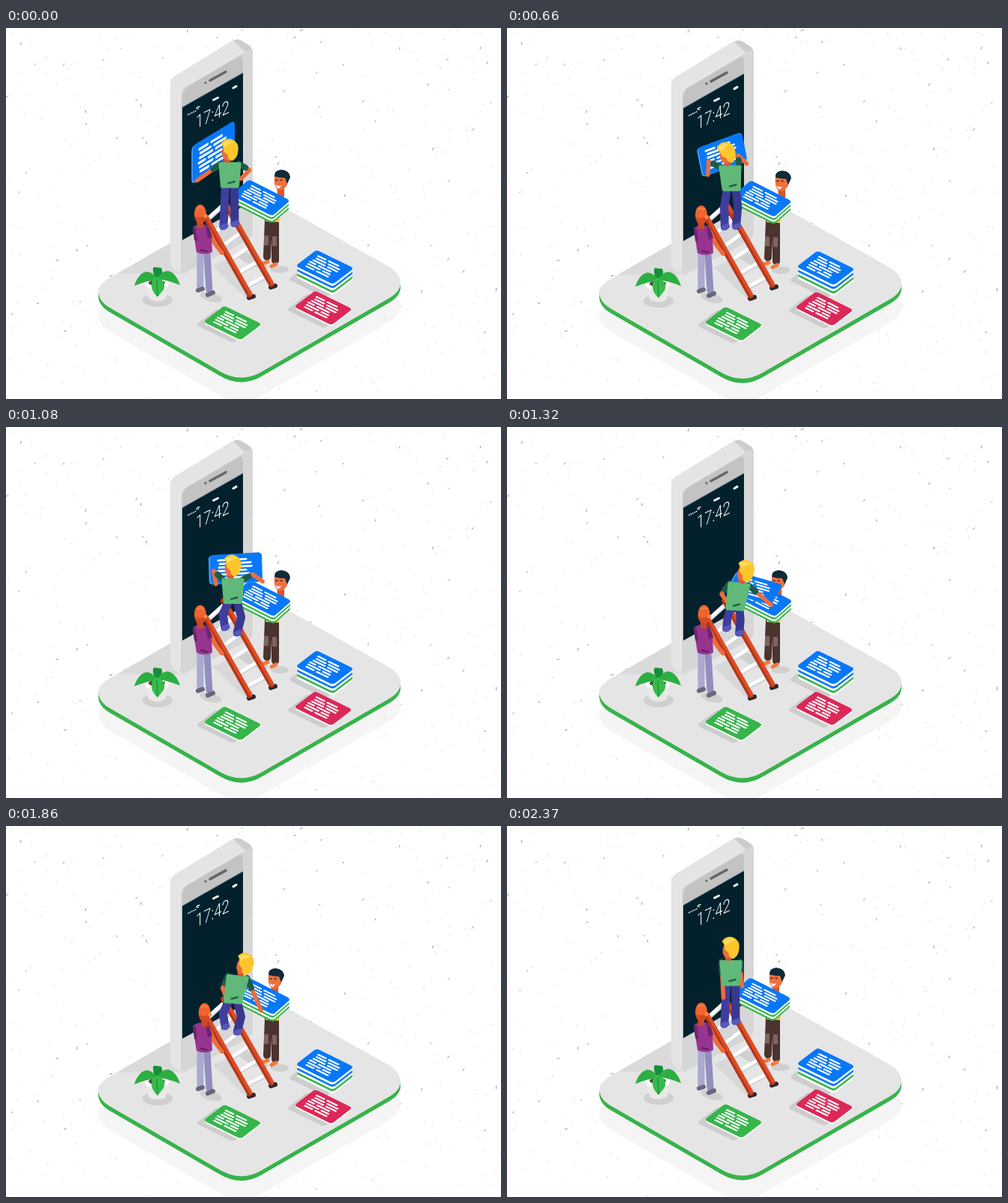
An HTML page that plays this animation: 660 px wide and 495 px high, repeating every 2400 ms.

```html
<!DOCTYPE html>
<html lang="en">
<head>
<meta charset="utf-8">
<title>Clearing phone notifications</title>
<style>
  html, body { margin: 0; width: 100%; height: 100%; overflow: hidden; background: #fff; }
  svg { display: block; width: 660px; height: 495px; }
  .line { fill: none; stroke-linecap: round; stroke-linejoin: round; }
  .skin { stroke: #ee6c3c; stroke-width: 5.5; }
  .sleeve { stroke: #1d5a48; stroke-width: 8; }
  .leg { stroke: #3f3e9f; stroke-width: 11; }
  .shoe { stroke: #5558bb; stroke-width: 7; }
  .clock { font: 300 24px Roboto, "Liberation Sans", sans-serif; fill: #fff; }
</style>
</head>
<body>
<svg viewBox="0 0 660 495">
  <defs>
    <path id="slab" d="M146 328 L318 229 Q335 219 352 228 L508 316 Q526 326 526 339 Q526 351 510 360 L342 457 Q314 474 285 457 L138 372 Q123 363 123 350 Q123 340 146 328Z"/>
    <rect id="plate" width="100" height="70" rx="8"/>
    <path id="rows" class="line" stroke="#fff" stroke-width="4.8"/>
  </defs>

  <use href="#slab" y="33" fill="#f5f5f5"/>
  <g id="specks" class="line"></g>

  <g class="bob">
    <use href="#slab" y="7" fill="#37b34a"/>
    <use href="#slab" y="1" fill="#e5e5e5"/>
    <path d="M148 328 L222 285 L240 328Z" fill="#dadada"/>

    <path d="M219 74 Q219 68 225 64 L300 18 Q308 13 316 18 L324 23 Q329 26 329 33 V270 Q329 280 321 284 L240 326 Q232 328 226 323 Q219 318 219 310Z" fill="#e4e4e4"/>
    <path d="M303 17 Q309 13 316 18 L324 23 Q329 26 329 36 L318 31Z" fill="#cdcdcd"/>
    <path d="M232 92 Q232 82 240 77 L318 31 Q329 26 329 36 V270 Q329 280 321 284 L240 326 Q232 328 232 320Z" fill="#d6d6d6"/>
    <path d="M235 105 V90 Q236 82 243 78 L311 38 Q316 36 316 43 V60Z" fill="#c3c3c3"/>
    <path d="M232 320 V92 Q232 82 240 77 L318 31" fill="none" stroke="#ededed" stroke-width="1.3"/>
    <path d="M235 106 L316 60 V238 L235 283Z" fill="#03212c"/>
    <path d="M235 106 L316 60" stroke="#3c566c"/>
    <path class="line" d="M272 70 L293 58.500" stroke="#666" stroke-width="3.500"/>
    <circle cx="266" cy="73" r="1.600" fill="#666"/>
    <path class="line" d="M243 115.500 L253 110.500" stroke="#fff" stroke-width="1.800" stroke-dasharray="0 2.700"/>
    <path class="line" d="M254 107.500 q1.500 -3 4 -2.500 M256 108 l.5 -.4" stroke="#fff" stroke-width="1.300"/>
    <path class="line" d="M276.500 96 L282.500 93" stroke="#fff" stroke-width="2.800"/>
    <path class="line" d="M303 80 L307 77.700" stroke="#fff" stroke-width="3"/>
    <text class="clock" transform="matrix(.77 -.37 0 1 253 134.500)">17:42</text>

    <g fill="#d0d0d0">
      <ellipse cx="202" cy="363" rx="20" ry="9"/>
      <ellipse cx="273" cy="359" rx="15" ry="6" transform="rotate(15 273 359)"/>
      <ellipse cx="329" cy="310" rx="22" ry="7" transform="rotate(25 329 310)"/>
      <path d="M276 318 L297 308 L330 352 L322 362Z" opacity=".6"/>
      <ellipse cx="365" cy="322" rx="12" ry="5"/>
    </g>

    <g transform="translate(0 -2)">
      <path d="M186 344 L190 363 Q202 370 213 363 L217 344Z" fill="#e9e9e9"/>
      <ellipse cx="201" cy="343" rx="16" ry="8" fill="#fff"/>
      <ellipse cx="201" cy="342" rx="11" ry="4" fill="#59423a"/>
      <path d="M200 339 Q194 325 197 321 L207 322 Q211 330 203 339Z" fill="#159038"/>
      <path id="leaf" d="M201 338 Q188 339 171 346 Q176 330 187 327 Q198 328 201 338Z" fill="#2cae43"/>
      <use href="#leaf" transform="matrix(-1 0 0 1 403 -1)"/>
      <path d="M201 334 Q215 340 210 351 L202 361 Q193 352 194 344 Q194 337 201 334Z" fill="#36bb4b"/>
      <path d="M201 338 L202 360" stroke="#15863a"/>
    </g>

    <g id="ground"></g>

    <g id="porter">
      <path class="line" d="M350 256 L348 305 M359 256 L359 310" stroke="#4b332e" stroke-width="10"/>
      <path d="M344 277 h6 v13 h-6z M355 278 h6 v13 h-6z" fill="#80645d"/>
      <path class="line" d="M349 312 L340 315 M360 315 L354 318" stroke="#f2793f" stroke-width="5"/>
      <path d="M352 226 L370 224 L364 259 L346 258Z" fill="#f5c634"/>
      <g id="porterHead">
        <path d="M361 208 h10 v17 h-9z" fill="#d9552d"/>
        <path d="M358 197 Q367 191 376 198 L375 209 Q370 218 363 216 Q356 212 358 197Z" fill="#f0703e"/>
        <path d="M358 198 Q357 190 367 189 Q378 190 379 199 L375 208 L372 200 Q364 200 358 198Z" fill="#102a37"/>
        <path d="M359 209 q4 3 8 1 q-2 4 -5 4z" fill="#fff"/>
        <path d="M359.500 203 h3 m3 0 h3" stroke="#3a2323" stroke-width="1.500"/>
      </g>
    </g>
    <g id="stack"></g>

    <g id="ladder"></g>
  </g>

  <g id="load"></g>
  <g id="climber">
    <path class="line leg" id="legR" style="stroke:#383890"/>
    <path class="line leg" id="legL"/>
    <path class="line shoe" id="shoes"/>
    <path class="line skin" id="arms"/>
    <path class="line sleeve" id="sleeves"/>
    <path id="torso" fill="#60b978" stroke="#60b978" stroke-width="5" stroke-linejoin="round"/>
    <path class="line" id="badge" stroke="#245f4c" stroke-width="2.500"/>
    <g id="head">
      <path d="M-5 2 h9 v14 q-5 3 -9 0z" fill="#d9552d"/>
      <ellipse cx="-2" cy="3" rx="7.500" ry="11" fill="#ee6c3c"/>
      <path d="M-12 -7 Q-7 -17 3 -14 Q12 -11 12 -1 Q13 9 6 14 Q0 14 -1 7 L-7 3 Q-7 -3 -12 -7Z" fill="#fdc72c"/>
      <path d="M-10 -8 Q-3 -14 5 -11 Q-2 -8 -6 -3Z" fill="#ffdc62"/>
    </g>
  </g>

  <g class="bob">
    <path class="line" d="M268 300 L271 349" stroke="#918fbd" stroke-width="9"/>
    <path class="line" d="M259 300 L259 345" stroke="#aaa9cf" stroke-width="9"/>
    <path class="line" d="M256 350 L262 348 M269 356 L276 353" stroke="#68677c" stroke-width="6"/>
    <path class="line" d="M271 271 L278 287 L288 300" stroke="#ee6c3c" stroke-width="5.500"/>
    <path d="M249 266 Q257 259 267 263 Q273 267 274 278 L275 299 Q264 304 254 299Z" fill="#96348f"/>
    <path d="M266 263 Q273 267 275 279 L269 281Z" fill="#6b256e"/>
    <path class="line" d="M251 268 L253 282" stroke="#6b256e" stroke-width="4"/>
    <path class="line" d="M260 296 l8 2" stroke="#5d1f60" stroke-width="2"/>
    <g id="helperHead">
      <path d="M254 254 h9 v13 h-8z" fill="#c9482a"/>
      <ellipse cx="259" cy="248" rx="8" ry="12.500" fill="#f0642f"/>
      <path d="M252 251 Q258 255 266 250 Q266 260 259 262 Q252 259 252 251Z" fill="#d54a22"/>
      <circle cx="266" cy="251" r="2.500" fill="#f58a52"/>
      <path class="line" d="M255 241 q4 -3 8 0" stroke="#f98b4e" stroke-width="1.500"/>
    </g>
  </g>
</svg>
<script>
const LOOP = 2400, STEP = 30, LAND = 1440;
const BLUE = '#0878f8', GREEN = '#35b54a', RED = '#dc2858', WHITE = '#fff';
const el = id => document.getElementById(id);
const setPath = (id, d) => el(id).setAttribute('d', d);

let seed = 17;
const rnd = () => (seed = seed * 16807 % 2147483647) / 2147483647;

function specks(count, size, color, width) {
  let d = '';
  for (let i = 0; i < count; i++) {
    const a = -rnd() * 1.6, l = size * (.4 + rnd());
    d += `M${rnd() * 660} ${rnd() * 495}l${l * Math.cos(a)} ${l * Math.sin(a)}`;
  }
  return `<path d="${d}" stroke="${color}" stroke-width="${width}"/>`;
}
el('specks').innerHTML = specks(420, 1.3, '#cfcfcf', .8) + specks(85, 2.6, '#858585', .9);

// Ragged rows of dashes, standing in for message text.
function dashes() {
  let d = '';
  for (let y = 14; y < 60; y += 8.5) {
    const end = 62 + 22 * rnd();
    for (let x = 14 + 8 * rnd(); x < end;) {
      const w = 8 + 24 * rnd();
      d += `M${x} ${y}h${Math.min(w, end - x)}`;
      x += w + 9;
    }
  }
  return d;
}
setPath('rows', dashes());

// Cards are drawn on a 100 x 70 plate placed by its corner and two edges.
const matrix = ([x, y, ux, uy, vx, vy]) =>
  `matrix(${ux / 100} ${uy / 100} ${vx / 70} ${vy / 70} ${x} ${y})`;
const plate = (m, fill) => `<use href="#plate" transform="${matrix(m)}" fill="${fill}"/>`;
const shift = ([x, y, ...edges], dx, dy) => [x + dx, y + dy, ...edges];

function pile(m, gap, colors) {
  const sheets = colors.map((c, i) => plate(shift(m, 0, i * gap), c)).reverse().join('');
  return sheets + `<use href="#rows" transform="${matrix(m)}"/>`;
}
function onGround(x, y, gap, ...colors) {
  const m = [x, y, 50, 24.5, -28, 21.5];
  return plate(shift(m, -10, gap * colors.length), '#cdcdcd') + pile(m, gap, colors);
}
const onStack = [325, 202, 55, 28, -24, 21];
el('ground').innerHTML =
  onGround(414, 296, 3, BLUE, WHITE, BLUE, WHITE, GREEN, WHITE) +
  onGround(412, 350.5, 2, RED, WHITE) + onGround(291, 370.5, 2, GREEN, WHITE);
el('stack').innerHTML = pile(onStack, 2.5, [BLUE, WHITE, GREEN, WHITE, GREEN]);
el('load').innerHTML = `<use href="#plate" x="-3" y="1" fill="#46a0ff"/>
  <use href="#plate" fill="${BLUE}"/><use href="#rows"/>`;

function ladder() {
  const left = t => [266 + 60 * t, 252 + 106 * t];
  const right = t => [290 + 65 * t, 230 + 114 * t];
  const stroke = (a, b, color, w) =>
    `<path class="line" d="M${a}L${b}" stroke="${color}" stroke-width="${w}"/>`;
  let s = '';
  for (let t = .03; t < .9; t += .17) {
    const a = left(t), b = right(t), low = ([x, y]) => [x, y + 2];
    s += stroke(low(a), low(b), '#d2d2d8', 5) + stroke(a, b, WHITE, 4.5);
  }
  for (const rail of [right, left]) {
    const [x, y] = rail(1);
    s += stroke([x - 2, y + 2], [x + 4, y], '#30262b', 6);
    s += stroke(rail(0), rail(.98), '#b4371d', 7.5);
    s += `<g transform="translate(1.5 -.8)">${stroke(rail(0), rail(.98), '#e04d22', 4)}</g>`;
  }
  return s;
}
el('ladder').innerHTML = ladder();

const mix = (a, b, k) => a.map((v, i) => v + (b[i] - v) * k);
const add = ([x, y], dx, dy) => [x + dx, y + dy];
const poly = (...pts) => 'M' + pts.join('L');
const move = (id, x, y, r = 0) =>
  el(id).setAttribute('transform', `translate(${x} ${y}) rotate(${r})`);

// Eased 0 to 1 between two times.
function rise(t, from, to) {
  const k = Math.min(1, Math.max(0, (t - from) / (to - from)));
  return k * k * (3 - 2 * k);
}

// Middle joint of a limb of two equal bones.
function joint(a, b, bone, side) {
  const dx = b[0] - a[0], dy = b[1] - a[1], d = Math.hypot(dx, dy);
  const h = side * Math.sqrt(Math.max(0, bone * bone - d * d / 4)) / d;
  return add(mix(a, b, .5), dy * h, -dx * h);
}

// The card is peeled off the screen, tipped towards the viewer and laid on the stack.
const PATH = [
  [0, [249, 157, 56, -34, 0, 50]],
  [420, [256, 157, 50, -26, 2, 37]],
  [840, [253, 162, 65, -18, 12, 39]],
  [1080, [272, 171, 69, -4, 1, 39]],
  [LAND, shift(onStack, 1, 2)]
];
function cardAt(t) {
  const i = PATH.findIndex(([end]) => t < end);
  if (i < 0) return PATH.at(-1)[1];
  const [t0, a] = PATH[i - 1], [t1, b] = PATH[i];
  return mix(a, b, (t - t0) / (t1 - t0));
}

function drawClimber(t, [x, y, ux, uy, vx, vy]) {
  const down = rise(t, 420, 1500) - rise(t, 1560, 2370);
  const reach = rise(t, 1080, 1500) - rise(t, 1600, 2300);
  const peer = rise(t, 0, 420) - rise(t, 600, 1080);
  const bend = 6 * Math.sin(Math.PI * down);

  const hips = [298.5 + 6 * down, 211 + 34 * down];
  const chest = add(hips, 9 * reach - 2 * peer, -29.5 - 5 * reach);
  const skull = add(chest, 15 * reach - 4 * peer - 1, 2 * reach - 19);
  const [hipL, hipR] = [add(hips, -10, -reach), add(hips, 10, reach)];
  const [shL, shR] = [add(chest, -12.5, -2 * reach), add(chest, 12.5, 2 * reach)];

  const footL = [290 + 3 * down, 264 + 4 * down];
  const footR = [305 + 5 * down, 260 + 14 * Math.min(1, 2 * down)];
  const [legTopL, legTopR] = [add(hipL, 4, 0), add(hipR, -4, 0)];
  const kneeL = add(mix(legTopL, footL, .5), -bend, 0);
  const kneeR = add(mix(legTopR, footR, .5), bend, 0);

  const landed = t >= LAND;
  const corner = [x + vx, y + vy];
  const gripL = add(corner, ux * .1, uy * .1), gripR = add(corner, ux, uy);
  const restL = add(hips, -10 + 4 * reach, 18 - 28 * reach);
  const restR = add(hips, 15, landed ? 3 : -10);
  const handL = mix(gripL, restL, rise(t, 1100, LAND));
  const handR = mix(restR, gripR, rise(t, 420, 740) - rise(t, 1500, 2300));
  const elbowL = joint(shL, handL, 18, -1);
  const elbowR = joint(shR, handR, 16, 1);

  setPath('legL', poly(legTopL, kneeL, footL));
  setPath('legR', poly(legTopR, kneeR, footR));
  setPath('shoes', [footL, footR].map(f => poly(add(f, -2, 2), add(f, 3, 0))).join(''));
  setPath('arms', poly(shL, elbowL, handL) + poly(shR, elbowR, handR));
  setPath('sleeves', poly(shL, mix(shL, elbowL, .6)) + poly(shR, mix(shR, elbowR, .6)));
  setPath('torso', poly(shL, shR, hipR, hipL) + 'Z');
  setPath('badge', poly(add(hips, -2, -4), add(hips, 6, -6)));
  move('head', ...skull, 8 + 17 * reach - 18 * peer);
}

const bobs = document.querySelectorAll('.bob');

function draw(t) {
  const bob = 1 - Math.cos(2 * Math.PI * t / LOOP);
  bobs.forEach(g => g.setAttribute('transform', `translate(0 ${bob})`));
  move('stack', bob - 1, 0);
  move('porterHead', -8 * rise(t, 1080, 1500), 0);
  move('helperHead', 6 * (rise(t, 1080, 1500) - rise(t, 1800, 2370)), 0);

  const card = cardAt(t);
  el('load').setAttribute('visibility', t < LAND ? 'visible' : 'hidden');
  el('load').setAttribute('transform', matrix(card));
  drawClimber(t, card);
}

const start = performance.now();
function tick() {
  const t = (performance.now() - start) % LOOP;
  draw(Math.floor(t / STEP) * STEP);
  requestAnimationFrame(tick);
}
tick();
</script>
</body>
</html>
```
